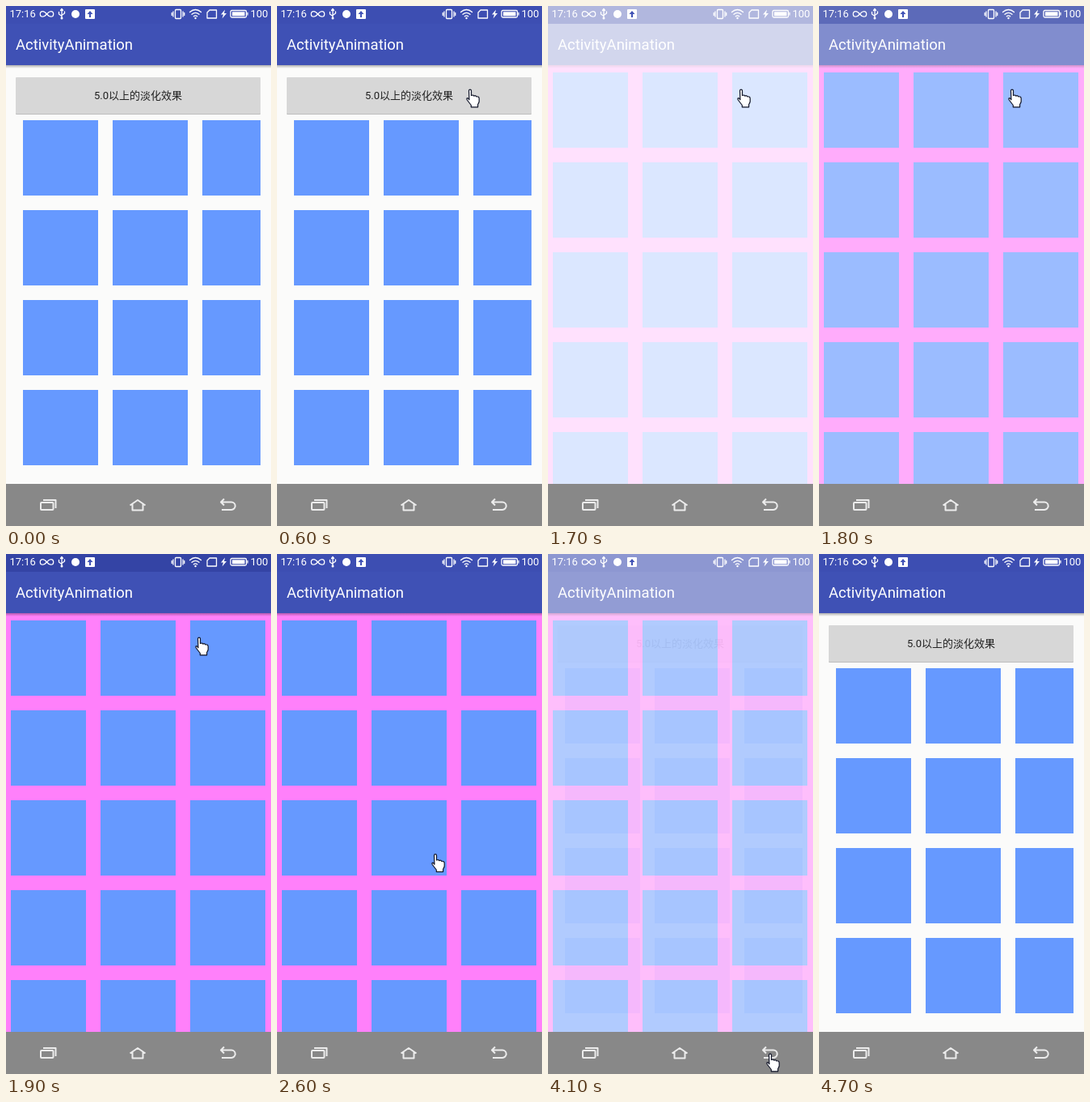
Recreate the animation shown at these times as an HTML page. Size 328 px wide and 642 px high, loop 6100 ms.

```html
<!DOCTYPE html>
<html lang="zh">
<head>
<meta charset="utf-8">
<title>Activity fade</title>
<style>
  html, body { margin: 0; width: 100%; height: 100%; overflow: hidden; background: #fff; }
  svg { display: block; width: 328px; height: 642px; }
  text { font-family: Roboto, "Noto Sans CJK SC", "Noto Sans CJK", sans-serif; }
  .line { fill: none; stroke: #fff; stroke-width: 1.3; stroke-linecap: round; stroke-linejoin: round; }
  .nav { fill: none; stroke: #ececec; stroke-width: 2; stroke-linejoin: round; }
</style>
</head>
<body>
<svg viewBox="0 0 328 642">
  <defs>
    <linearGradient id="shadow" x1="0" y1="0" x2="0" y2="1">
      <stop offset="0" stop-color="#000" stop-opacity=".3"/>
      <stop offset="1" stop-color="#000" stop-opacity="0"/>
    </linearGradient>
    <g id="appBar">
      <rect width="328" height="73" fill="#3f51b5"/>
      <rect y="73" width="328" height="4" fill="url(#shadow)"/>
    </g>
  </defs>
  <rect width="328" height="642" fill="#fff"/>

  <g id="home">
    <rect width="328" height="590" fill="#fbfbfa"/>
    <use href="#appBar"/>
    <rect x="12" y="89" width="303" height="45" rx="1" fill="#bdbdbd"/>
    <rect x="12" y="88" width="303" height="45" rx="1" fill="#d7d7d7"/>
    <text x="163.5" y="115" font-size="13" text-anchor="middle" fill="#212121">5.0以上的淡化效果</text>
    <g id="homeTiles" fill="#69f"/>
  </g>

  <g id="detail">
    <rect width="328" height="590" fill="#ff80fa"/>
    <use href="#appBar"/>
    <g id="detailTiles" fill="#69f"/>
  </g>

  <rect id="shade" width="328" height="22" fill="#303f9f"/>
  <text x="12" y="54" font-size="18.5" fill="#fff">ActivityAnimation</text>

  <g id="statusBar">
    <text x="4.500" y="14" font-size="13" fill="#fff">17:16</text>
    <text x="302.500" y="14" font-size="13" fill="#fff">100</text>
    <path class="line" d="M50.500 10C48 7 46.500 6.700 45.500 6.700a3.200 3.200 0 0 0 0 6.400C46.500 13.100 48 13 50.500 10s4-3.300 5-3.300a3.200 3.200 0 0 1 0 6.400c-1 0-2.500-.1-5-3.100z"/>
    <path class="line" d="M69 4v11M65.500 7.500v2.500l3.500 2.500M72.500 7v2l-3.500 2.500M67.500 5.500L69 3.500l1.500 2"/>
    <circle cx="69" cy="15" r="1.500" fill="#fff"/>
    <circle cx="86" cy="10" r="5" fill="#fff"/>
    <rect x="98" y="4" width="12" height="12" rx="1" fill="#fff"/>
    <path d="M104 6l3.500 4H105v4h-2v-4h-2.500z" fill="#3f51b5"/>
    <rect class="line" x="209.500" y="4.500" width="7" height="11" rx="1"/>
    <path class="line" d="M207 7v6M219 7v6M205.300 8.500v3M220.700 8.500v3"/>
    <path class="line" d="M227.500 7.500q7-6 14 0M230 10.300q4.500-3.800 9 0M232.300 12.800q2.200-1.800 4.400 0"/>
    <circle cx="234.500" cy="15" r="1.200" fill="#fff"/>
    <path class="line" d="M252 5h8.500v10H249V8z"/>
    <path d="M271 4.500l-5 6h3l-1.500 5 5.500-6.500h-3z" fill="#fff"/>
    <rect class="line" x="278" y="5.500" width="19.500" height="8.500" rx="1.500"/>
    <rect x="280" y="7.300" width="15.500" height="5" fill="#fff"/>
    <path class="line" d="M299 8.500v2.500"/>
  </g>

  <rect y="590" width="328" height="52" fill="#888"/>
  <g class="nav">
    <rect x="43" y="613" width="15.500" height="9" rx="1"/>
    <path d="M46 610h15.500v10"/>
    <path d="M153.500 616.500l9.500-6.500 9.500 6.500M156.500 615v7.500h13V615"/>
    <path d="M270 608.500l-4 4 4 4M266 612.500h13a4.700 4.700 0 0 1 0 9.400h-12"/>
  </g>

  <circle id="touch" r="10.500" fill="#fff" fill-opacity=".25" stroke="#bbb" stroke-opacity=".45" stroke-width=".8"/>
  <path id="hand" fill="#fff" stroke="#111528" stroke-width="1.200" stroke-linejoin="round"
    d="M3.500 2.200Q3.500.7 5 .7T6.500 2.200V8Q9 6.800 9.700 8.600 12 7.600 12.800 9.400 16.200 8.600 16.200 12V15.500Q15.700 17.500 14.600 19V22.300H6.300V20L1.300 13.500Q.3 11.500 1.700 11.200 2.800 11.300 3.900 13.300z"/>
</svg>
<script>
const LOOP = 6100;
const el = id => document.getElementById(id);

// time, home opacity, detail opacity, status bar shade
const FADE = [
  [0, 1, 0, .12],
  [1700, 0, .23, .2], [1800, 0, .65, .45], [1900, 0, 1, .7], [2000, 0, 1, .4], [2100, 0, 1, .12],
  [3900, 0, .93, .1], [4000, .06, .74, .08], [4100, .12, .5, .05],
  [4300, 1, 0, .12]
];
// time, left, top; no position hides the pointer
const POINTER = [
  [0],
  [100, 266, 82], [200, 259, 86], [300, 251, 92], [400, 244, 97], [500, 238, 101], [600, 234, 102.500],
  [2400, 226, 145], [2500, 205, 245], [2600, 191, 370], [2700, 195, 475],
  [2800, 224, 558], [2900, 254, 602], [3000, 270, 616.500],
  [4600, 279, 547], [4700]
];
// time, pressed
const TOUCH = [[0, 0], [1600, 1], [1700, 0], [3200, 1], [3400, 0]];

function addTiles(group, left, top, rows, right) {
  for (let i = 0; i < rows * 3; i++) {
    const x = left + i % 3 * 111;
    const tile = document.createElementNS("http://www.w3.org/2000/svg", "rect");
    const box = { x, y: top + Math.floor(i / 3) * 111, width: Math.min(93, right - x), height: 93 };
    for (const key in box) tile.setAttribute(key, box[key]);
    group.append(tile);
  }
}

const stepAt = (table, time) => table.findLast(row => row[0] <= time);

function draw(time) {
  const [, home, detail, shade] = stepAt(FADE, time);
  el("home").style.opacity = home;
  el("detail").style.opacity = detail;
  el("shade").style.opacity = shade;

  const [, x, y] = stepAt(POINTER, time);
  const shown = x !== undefined;
  el("hand").style.display = shown ? "" : "none";
  el("touch").style.display = shown && stepAt(TOUCH, time)[1] ? "" : "none";
  if (shown) {
    el("hand").setAttribute("transform", `translate(${x} ${y})`);
    el("touch").setAttribute("transform", `translate(${x + 4.500} ${y + 2})`);
  }
}

addTiles(el("homeTiles"), 21, 141, 4, 315);
addTiles(el("detailTiles"), 6, 82, 5, 328);

const start = performance.now();
function tick() {
  draw((performance.now() - start) % LOOP);
  requestAnimationFrame(tick);
}
tick();
</script>
</body>
</html>
```
